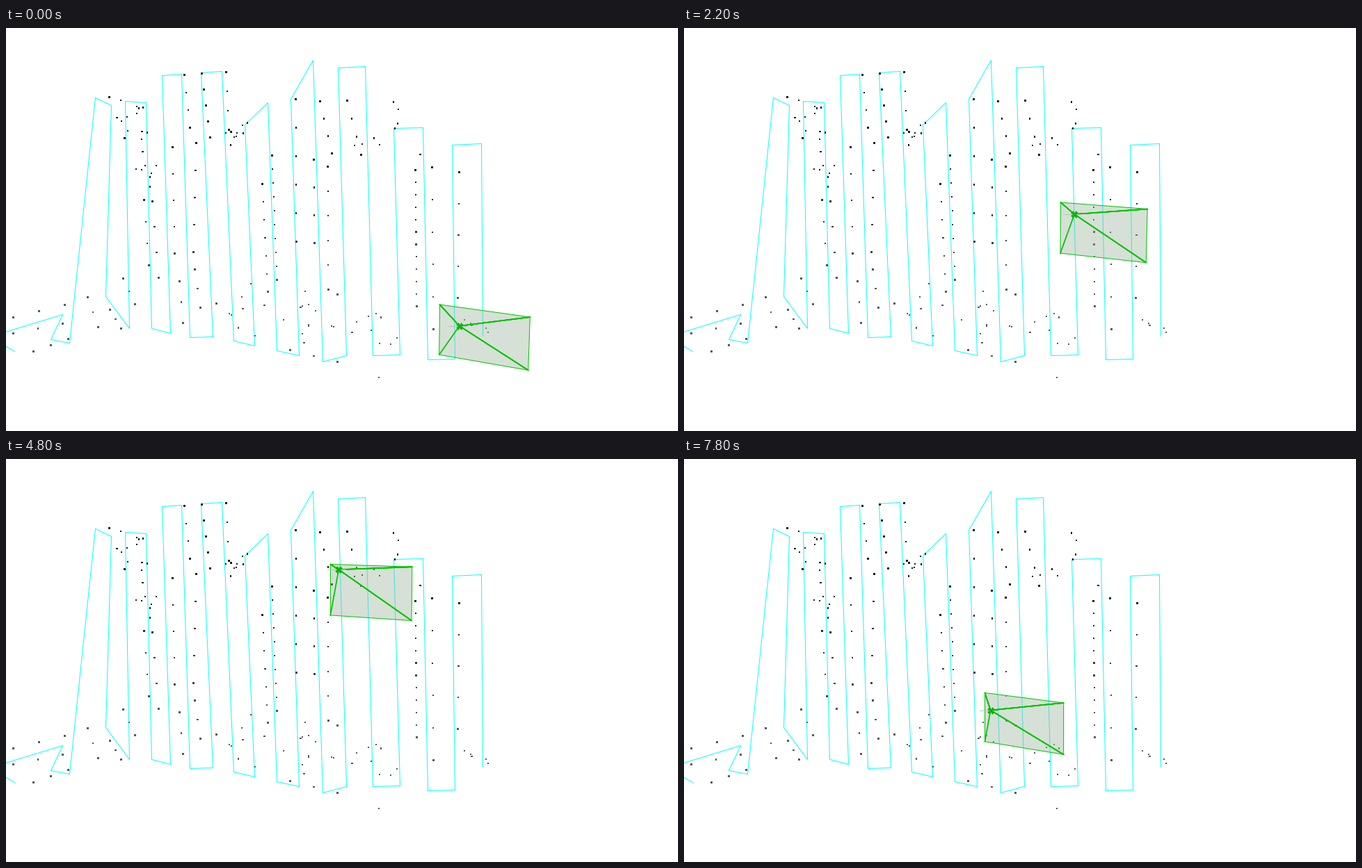
Animation of 966x580 px, one loop 8000 ms. Source, as a matplotlib script:

```python
import numpy as np
import matplotlib.pyplot as plt
from matplotlib.animation import FuncAnimation

W, H, DPI = 966, 580, 100
PX = 72 / DPI
STEP, LOOP = 200, 8000
CYAN, GREEN, PANE = "#00ffff", "#00c400", (0.644, 0.738, 0.644, 0.45)

fig = plt.figure(figsize=(W / DPI, H / DPI), dpi=DPI, facecolor="white")
ax = fig.add_axes([0, 0, 1, 1])
ax.set(xlim=(-0.5, W - 0.5), ylim=(H - 0.5, -0.5))
ax.axis("off")

# Turning points of the flight path, left to right
route = np.array([
    (12, 465), (-24, 444), (81, 412), (64, 448), (91, 453), (128, 100),
    (151, 111), (143, 386), (177, 432), (171, 105), (201, 107), (209, 432),
    (236, 439), (224, 68), (252, 66), (264, 445), (297, 444), (280, 64),
    (310, 62), (327, 450), (357, 457), (343, 139), (376, 107), (389, 464),
    (421, 471), (409, 102), (441, 46), (455, 480), (489, 471), (477, 57),
    (516, 55), (527, 471), (566, 470), (557, 144), (599, 143), (606, 477),
    (645, 476), (641, 168), (683, 166), (685, 443)])
ax.plot(*route.T, color=CYAN, lw=PX, zorder=1)

# Tie points: evenly spaced rows (x0, y0, x1, y1, count)
rows = [
    (10, 416, 84, 398, 3), (10, 439, 81, 425, 3), (39, 465, 89, 447, 3),
    (117, 387, 132, 430, 3), (149, 405, 165, 432, 3), (168, 360, 185, 397, 3),
    (148, 99, 170, 158, 3), (198, 247, 205, 341, 4), (210, 249, 219, 359, 4),
    (239, 171, 242, 324, 5), (249, 364, 254, 424, 3), (256, 67, 264, 143, 4),
    (271, 347, 279, 402, 3), (273, 165, 269, 322, 5), (281, 65, 293, 157, 5),
    (316, 63, 320, 146, 4), (368, 224, 376, 379, 7), (382, 183, 389, 362, 10),
    (416, 102, 417, 307, 6), (442, 189, 443, 309, 4), (462, 199, 463, 376, 6),
    (408, 463, 476, 480, 3), (451, 105, 468, 180, 4), (490, 104, 510, 182, 4),
    (588, 204, 590, 400, 12), (612, 200, 614, 433, 6), (651, 207, 649, 388, 5)]
ties = [np.linspace((a, b), (c, d), n) for a, b, c, d, n in rows]

# Loose points: centre, spread and count of each cloud
rng = np.random.default_rng(7)
clouds = [(195, 140, 16, 28, 12), (207, 212, 8, 18, 7), (330, 150, 12, 9, 9),
          (335, 415, 25, 24, 9), (435, 410, 28, 28, 12),
          (530, 440, 32, 28, 11), (560, 150, 28, 22, 9),
          (670, 440, 18, 16, 5)]
for cx, cy, sx, sy, n in clouds:
    ties.append(rng.normal((cx, cy), (sx, sy), (n, 2)))
ties = np.vstack(ties)

# Lower points are a little paler
tone = 0.1 + 0.25 * np.clip((ties[:, 1] - 200) / 180, 0, 1)
ax.scatter(*ties.T, s=(2.2 * PX) ** 2, marker="s", c=tone, cmap="gray",
           vmin=0, vmax=1, linewidths=0, zorder=2)

# The camera holds each place (top left corner), then jumps to the next
times = [0, *range(600, 3801, 400), *range(4800, 7801, 1000)]
places = [
    (623, 397.5), (618.5, 233), (577.5, 150), (582.5, 319), (545, 418.5),
    (541, 250.5), (515.5, 103), (502.5, 255), (509.5, 418), (468, 312),
    (466, 151), (429, 20), (427.5, 176), (432, 336)]

pane, = ax.fill([0, 1, 1], [0, 0, 1], color=PANE, lw=0, zorder=3)
edge, = ax.plot([], [], color=GREEN, lw=PX, zorder=4)
rays, = ax.plot([], [], color=GREEN, lw=1.7 * PX, zorder=4)
tail, = ax.plot([], [], color="#b4c8b4", lw=PX, zorder=4)
hub, = ax.plot([], [], "X", ms=10 * PX, mfc="#10b010", mec=GREEN, mew=0.5 * PX,
               zorder=5)


def frustum(x, y):
    """Corners and apex of the camera, which looks larger further right."""
    u = x - 430
    w = 113 + 0.105 * u - 0.00012 * u * (y - 250)
    h = 75 + 0.0155 * u - 0.0145 * y
    lean = max(w - 113, 0) * 0.16
    corners = np.array([
        (x, y),
        (x + w, y + 0.058 * y - 5),
        (x + w - lean, y + h + 0.059 * y - 1.2),
        (x - 0.3 * lean, y + h)])
    return corners, np.array([x + 8 + 0.105 * u, y + 0.094 * y - 6.5])


def draw(i):
    k = np.searchsorted(times, i * STEP, side="right") - 1
    corners, apex = frustum(*places[k])
    pane.set_xy(corners)
    edge.set_data(*corners[[0, 1, 2, 3, 0]].T)
    spokes = [p for c in corners for p in (apex, c)]
    rays.set_data(*np.array(spokes).T)
    tail.set_data([apex[0] - 16, apex[0] + 10], [apex[1], apex[1]])
    hub.set_data([apex[0]], [apex[1]])
    return pane, edge, rays, tail, hub


anim = FuncAnimation(fig, draw, frames=LOOP // STEP, interval=STEP,
                     repeat=True, repeat_delay=0)
plt.show()
```
